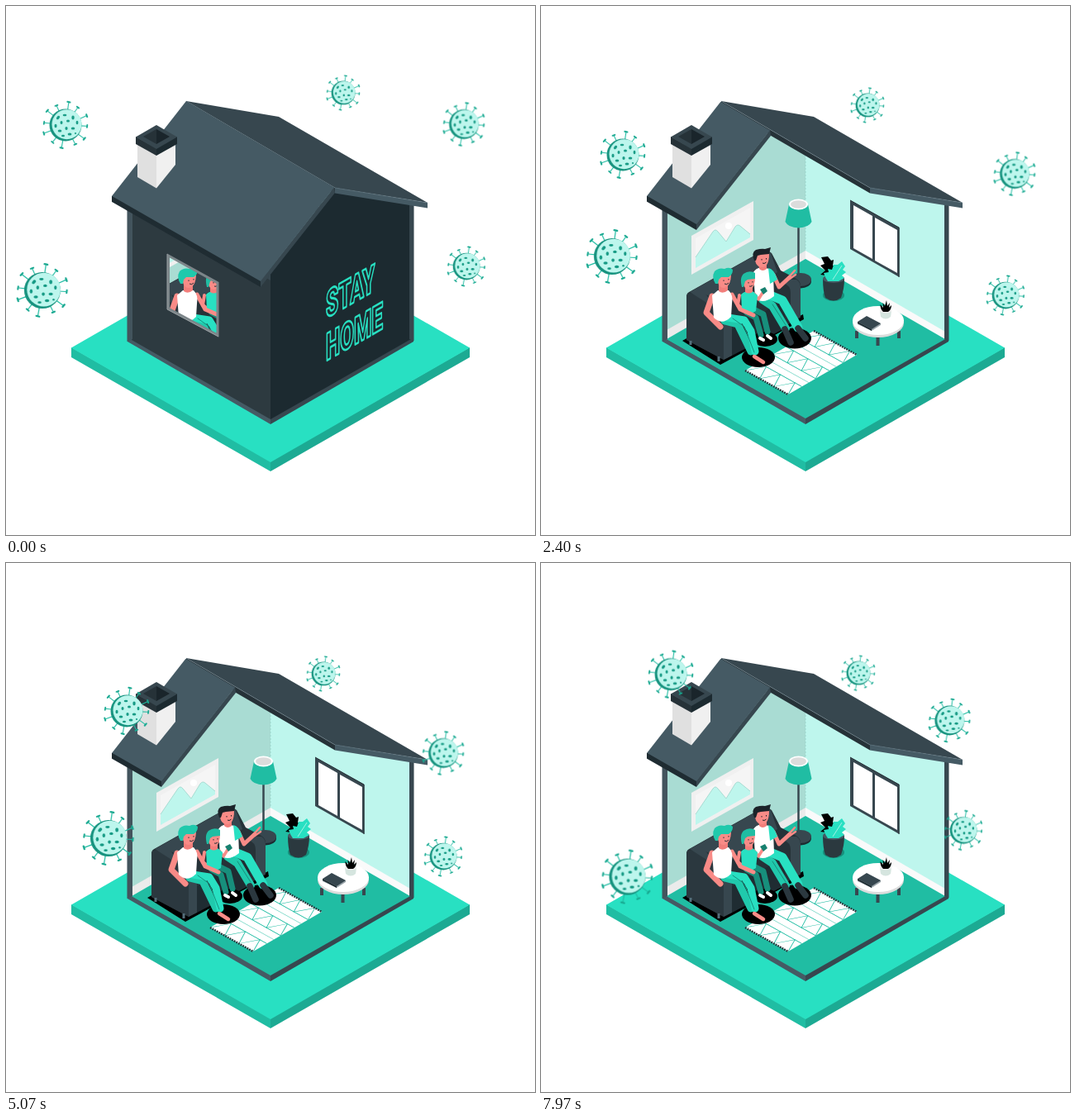
An HTML page without scripts that plays this animation: 640 px wide and 640 px high, repeating every 8 s.

```html
<!DOCTYPE html>
<html lang="en">
<head>
<meta charset="utf-8">
<title>Stay home</title>
<style>
html, body { margin: 0; width: 100%; height: 100%; overflow: hidden; background: #fff; }
svg { display: block; width: 100vw; height: 100vh; }

.virus, .roof, .wipe, .front { animation: 8s linear infinite; }
.roof { animation-name: roof; }
.wipe { animation-name: wipe; }
.front { animation-name: fade; }
.a { animation-name: a; }
.b { animation-name: b; }
.c { animation-name: c; }
.d { animation-name: d; }
.e { animation-name: e; }

@keyframes roof {
  0%, 12.5% { transform: translate(0, 0); animation-timing-function: ease-in; }
  19.13% { transform: translate(-29px, -16.7px); animation-timing-function: cubic-bezier(.4, .4, .6, 1); }
  28.75%, 100% { transform: translate(-120px, -69px); }
}
@keyframes wipe {
  0%, 12.5% { transform: translateY(-90px); animation-timing-function: ease-in; }
  19.13% { transform: translateY(0); animation-timing-function: cubic-bezier(.4, .4, .6, 1); }
  28.75%, 100% { transform: translateY(175px); }
}
@keyframes fade {
  0%, 12.5% { opacity: 1; animation-timing-function: ease-in; }
  19.13% { opacity: .87; animation-timing-function: cubic-bezier(.4, .3, .6, 1); }
  28.75%, 100% { opacity: 0; }
}

/* drifting paths */
@keyframes a {
  0% { transform: translate(72px, 144px); }
  9.56% { transform: translate(77.9px, 157.1px); }
  19.13% { transform: translate(86px, 169px); }
  24.56% { transform: translate(92.2px, 175px); }
  30% { transform: translate(99px, 180px); }
  39.8% { transform: translate(112.7px, 184.7px); }
  49.63% { transform: translate(127px, 185px); }
  56.5% { transform: translate(137.1px, 182.8px); }
  63.38% { transform: translate(146px, 179px); }
  73.75% { transform: translate(154.2px, 172px); }
  84.13% { transform: translate(158px, 161px); }
  91.9% { transform: translate(158.5px, 148.7px); }
  100% { transform: translate(157px, 134px); }
}
@keyframes b {
  0% { transform: translate(44px, 344px); }
  9.56% { transform: translate(46.5px, 322px); }
  19.13% { transform: translate(62px, 307px); }
  24.56% { transform: translate(73.8px, 303.2px); }
  30% { transform: translate(86px, 303px); }
  39.8% { transform: translate(101.6px, 306.4px); }
  49.63% { transform: translate(113px, 315px); }
  56.5% { transform: translate(119.6px, 323.4px); }
  63.38% { transform: translate(124px, 333px); }
  73.75% { transform: translate(125.2px, 348.3px); }
  84.13% { transform: translate(121px, 363px); }
  91.9% { transform: translate(114px, 372.1px); }
  100% { transform: translate(104px, 380px); }
}
@keyframes c {
  0% { transform: translate(408px, 105px); }
  19.13% { transform: translate(400px, 114px); }
  30% { transform: translate(395px, 120px); }
  49.63% { transform: translate(388px, 129px); }
  63.38% { transform: translate(384px, 134px); }
  73.75% { transform: translate(381.8px, 136.7px); }
  84.13% { transform: translate(381px, 137px); }
  91.9% { transform: translate(381.6px, 136px); }
  100% { transform: translate(384px, 133px); }
}
@keyframes d {
  0% { transform: translate(554px, 143px); }
  9.56% { transform: translate(567px, 158.9px); }
  19.13% { transform: translate(574px, 178px); }
  24.56% { transform: translate(574.6px, 190.6px); }
  30% { transform: translate(573px, 203px); }
  39.8% { transform: translate(563.7px, 222.9px); }
  49.63% { transform: translate(550px, 235px); }
  56.5% { transform: translate(539.5px, 234.3px); }
  63.38% { transform: translate(529px, 230px); }
  73.75% { transform: translate(516.4px, 221.4px); }
  84.13% { transform: translate(506px, 210px); }
  91.9% { transform: translate(499.5px, 200.6px); }
  100% { transform: translate(494px, 190px); }
}
@keyframes e {
  0% { transform: translate(557px, 315px); }
  9.56% { transform: translate(564.5px, 326px); }
  19.13% { transform: translate(567px, 337px); }
  24.56% { transform: translate(565.2px, 343.9px); }
  30% { transform: translate(562px, 350px); }
  39.8% { transform: translate(554px, 356.1px); }
  49.63% { transform: translate(544px, 358px); }
  56.5% { transform: translate(536.3px, 357.3px); }
  63.38% { transform: translate(529px, 355px); }
  73.75% { transform: translate(520.7px, 348.8px); }
  84.13% { transform: translate(515px, 340px); }
  91.9% { transform: translate(512.3px, 332px); }
  100% { transform: translate(511px, 323px); }
}

.sign { font: 900 46px Roboto, "Open Sans", sans-serif; fill: none; stroke: #28e0c2; stroke-width: 2.8; stroke-linejoin: round; }
.limb { fill: none; stroke-linecap: round; stroke-linejoin: round; }
</style>
</head>
<body>
<svg viewBox="0 0 640 640">
<defs>
  <g id="spike">
    <path d="M0-18V-27.500" stroke="#20bda3" stroke-width="1.100"/>
    <path d="M-1.600-28.200L1.600-28" stroke="#18a890" stroke-width="2" stroke-linecap="round"/>
  </g>
  <g id="pair"><use href="#spike" transform="rotate(8)"/><use href="#spike" transform="rotate(35) scale(.93)"/></g>
  <g id="virus">
    <use href="#pair"/><use href="#pair" transform="rotate(58)"/><use href="#pair" transform="rotate(118)"/>
    <use href="#pair" transform="rotate(182)"/><use href="#pair" transform="rotate(241)"/>
    <use href="#pair" transform="rotate(300)"/>
    <circle r="19.500" fill="#17937f"/>
    <circle cx="1.500" cy="-.8" r="18" fill="#bdf6ed"/>
    <g fill="#159a84">
      <ellipse cx="-9" cy="-9" rx="1.700" ry="2.500" transform="rotate(40 -9 -9)"/>
      <ellipse cx="-1" cy="-12" rx="2.300" ry="1.300"/><ellipse cx="9" cy="-9" rx="1.700" ry="2.400"/>
      <ellipse cx="14" cy="-3" rx="1.400" ry="2.200"/><ellipse cx="3" cy="-5" rx="2" ry="1.500"/>
      <ellipse cx="-5" cy="-3" rx="1.500" ry="2.100"/><ellipse cx="-12" cy="1" rx="1.500" ry="2.300"/>
      <ellipse cx="9" cy="4" rx="2.300" ry="1.600"/><ellipse cx="1" cy="4" rx="1.600" ry="1.900"/>
      <ellipse cx="-7" cy="7" rx="2.300" ry="1.600"/><ellipse cx="5" cy="11" rx="2.400" ry="1.500"/>
      <ellipse cx="-3" cy="13" rx="2" ry="1.200"/><circle cx="12" cy="10" r="1.100"/>
    </g>
  </g>
  <clipPath id="behind"><path d="M218 115H640V420H128V230Z"/></clipPath>
  <clipPath id="below"><path class="wipe" d="M140 252L320 338L500 263V800H140Z"/></clipPath>
</defs>

<!-- ground -->
<path d="M79 413V425L320 563V551Z" fill="#20bda3"/>
<path d="M561 413V425L320 563V551Z" fill="#1caa93"/>
<path d="M79 413.5L320 275L561 413.5L320 552Z" fill="#28e0c2"/>

<!-- room -->
<path d="M147 400V406L320 506V498Z" fill="#455a64"/>
<path d="M493 400V406L320 506V498Z" fill="#37474f"/>
<path d="M320 300L489 403L320 499L152 403Z" fill="#20bda3"/>
<path d="M152 235L280 155L320 178V300L152 396Z" fill="#a9dcd3"/>
<path d="M320 176L398 222L489 240V398L320 300Z" fill="#bef6ed"/>
<path d="M152 392L320 296V306L152 403Z" fill="#ebebeb"/>
<path d="M489 394L320 296V306L489 403Z" fill="#fafafa"/>
<path d="M320 180V296" stroke="#93cfc4" stroke-width=".7" stroke-dasharray="2 2"/>

<!-- wall window -->
<path d="M374 235L433.500 268V328L374 294Z" fill="#37474f"/>
<path d="M378 241L401 254V306L378 293Z M404 256L431 271V323L404 308Z" fill="#fff"/>
<path d="M374 235L433 268V328" fill="none" stroke="#263238" stroke-width="1"/>

<!-- picture -->
<path d="M182 278L257 236V283L182 325Z" fill="#f0f0f0"/>
<path d="M187 281L253 244V280L187 317Z" fill="#f5f5f5"/>
<path d="M187 317V304L208 273Q211 269 214 273L224 285L235 267Q238 263 242 267L253 276V280Z" fill="#bef6ed"/>
<path d="M187 304L208 273Q211 269 214 273L224 285L235 267Q238 263 242 267L253 276" fill="none" stroke="#a9dcd3"/>
<circle cx="227" cy="266" r="4" fill="#fff"/>

<!-- lamp -->
<ellipse cx="314" cy="333" rx="13" ry="8.500" fill="#1c2a30"/>
<ellipse cx="314" cy="331" rx="13" ry="8" fill="#37474f"/>
<path d="M311.500 266V331" stroke="#37474f" stroke-width="2.500"/>
<path d="M300 240L295.500 261Q299 268 311.500 268.500Q324 268 327.500 261L323 240Z" fill="#20bda3"/>
<ellipse cx="311.500" cy="240" rx="11.500" ry="6.500" fill="#fff"/>
<ellipse cx="311.500" cy="240" rx="9.500" ry="4.800" fill="#dcdcdc"/>

<!-- plant -->
<ellipse cx="354" cy="350" rx="13" ry="7" fill="#178f7c"/>
<path d="M341 330Q341 345 344 353Q354 360 363 353Q367 342 367 330Z" fill="#2b393f"/>
<ellipse cx="354" cy="330" rx="13" ry="5" fill="#455a64"/>
<path d="M349 331L345 326L338 325L344 320L338 314L343 312L339 304L347 303L351 308L354 307L353 314L358 315L353 321L355 326Z" fill="#000"/>
<path d="M347 333Q344 329 342 323L348 322L347 318L352 319L354 313L359 313L364 309L368 315L365 319L369 322L364 326L367 329L360 333Z" fill="#28e0c2"/>
<path d="M353 331L364 314" stroke="#bef6ed" stroke-width=".8"/>

<!-- table -->
<path d="M382 393V402M407.500 401V411M433 393V402" stroke="#37474f" stroke-width="4"/>
<ellipse cx="408" cy="383" rx="31" ry="18" fill="#dcdcdc"/>
<ellipse cx="408" cy="380.500" rx="31" ry="17.500" fill="#fff"/>
<path d="M383 382V385L400 393L411 386V384Z" fill="#9aa5aa"/>
<path d="M383 382L394 375L411 384L400 391Z" fill="#37474f"/>
<path d="M383 382V384L400 393V391Z" fill="#1c2a30"/>
<path d="M410 369L411 376Q417 381 423 376L424 369Z" fill="#d5e5df"/>
<ellipse cx="417" cy="369" rx="7" ry="2.500" fill="#ececec"/>
<path d="M414 370Q410 366 410.500 361L414 365L413.500 359L416 363L418 356L419 363L422 359L421 365L424 362Q424 367 420 370Z" fill="#000"/>

<!-- rug, drawn flat on the floor -->
<path d="M247 441L330 393L382 422L299 470Z" fill="#fff"/>
<g transform="matrix(.83 -.48 .52 .29 247 441)" fill="none" stroke="#20bda3" stroke-width="1.100">
  <path d="M20 0V100M40 0V100M60 0V100M80 0V100"/>
  <path id="zigzag" d="M0 0L20 17L0 34L20 50L0 67L20 84L0 100"/>
  <use href="#zigzag" x="40"/>
  <use href="#zigzag" x="80"/>
  <path d="M30 0V100M70 0V100" stroke-width=".6"/>
</g>
<path d="M247 441L299 470M330 393L382 422" stroke="#263238" stroke-width="2.400" stroke-dasharray="1.8 1.200"/>

<!-- sofa -->
<path d="M171 405L178 401L220 424L317 373L318 379L217 434Z" fill="#000"/>
<path d="M176 351Q176 347 181 345L265 298Q273 293 279 299L290 320L309 330Q314 333 314 339V377L221 428L176 404Z" fill="#263238"/>
<path d="M184 344L266 298Q273 294 278 299L286 322L225 358Z" fill="#37474f"/>
<path d="M176 351Q178 345 186 349L213 366Q221 371 221 379V428L176 404Z" fill="#2b383f"/>
<path d="M180 346L188 342Q196 343 202 352L228 380Q231 384 231 390V423L221 428V380Q221 372 213 367Z" fill="#37474f"/>
<path d="M231 391L295 356V390L231 423Z" fill="#1f2c32"/>
<path d="M296 331L309 331Q314 334 314 341V376L302 383V347Q302 338 293 335Z" fill="#37474f"/>
<path d="M181 405V410M215 424V430" stroke="#546e7a" stroke-width="3"/>
<ellipse cx="263" cy="425" rx="20" ry="12" fill="#000"/>
<ellipse cx="307" cy="402" rx="20" ry="12.500" fill="#000"/>
<ellipse cx="271" cy="403" rx="15" ry="9" fill="#000"/>

<!-- father -->
<g class="limb">
  <path d="M281 325L288 340L301 328" stroke="#f98b87" stroke-width="5"/>
  <path d="M299 329L307 320M301 330L308 325" stroke="#f98b87" stroke-width="2.500"/>
  <path d="M268 355L280 363L296 390" stroke="#20c9ac" stroke-width="10"/>
  <path d="M275 349L292 356L311 389" stroke="#28e0c2" stroke-width="11"/>
  <path d="M280 361L296 386" stroke="#178f7c" stroke-width="1"/>
  <path d="M295 391L302 407M311 390L320 402" stroke="#2b383f" stroke-width="7.500"/>
</g>
<path d="M257 322Q261 316 268 317Q279 316 281 325L282 351Q268 362 259 353Z" fill="#fff"/>
<path d="M275 317Q282 318 286 331L277 336Z" fill="#28e0c2"/>
<path d="M263 309H273V318Q268 322 264 318Z" fill="#f27e7b"/>
<path d="M259 302Q258 316 268 316Q276 315 276 300L265 297Z" fill="#f98b87"/>
<path d="M258 308Q254 298 260 295Q267 293 271 294L278 292L276 300L266 301L262 302L260 308Z" fill="#1c2329"/>
<path d="M267 306V307.500M272.500 305V306.500M268 311Q270 312.500 272.500 310" fill="none" stroke="#1c2329"/>

<!-- daughter -->
<g class="limb">
  <path d="M249 371L260 377L266 398M257 367L269 373L274 394" stroke="#178f7c" stroke-width="7"/>
  <path d="M265 402L269 404M274 399L278 402" stroke="#fff" stroke-width="4"/>
  <path d="M258 348L263 355L268 347" stroke="#f98b87" stroke-width="3.500"/>
  <path d="M240 350L238 362L252 372" stroke="#f98b87" stroke-width="4"/>
</g>
<path d="M242 349Q247 344 256 345L262 350L260 369Q250 376 243 368Z" fill="#28e0c2"/>
<path d="M247 338H256V346Q251 349 247 346Z" fill="#f27e7b"/>
<path d="M244 329Q244 343 252 343Q259 342 259 328Z" fill="#f98b87"/>
<path d="M243 340Q240 329 245 324Q252 319 259 323L259 330L250 331L247 333L245 340Z" fill="#20bda3"/>
<path d="M251 334V335.500M256 333V334.500M252 339Q254 340 256 338" fill="none" stroke="#263238"/>
<path d="M265 343L271 340L274 345L269 349Z" fill="#17806f"/>

<!-- mother -->
<g class="limb">
  <path d="M231 349L241 367L257 374" stroke="#f98b87" stroke-width="5"/>
  <path d="M222 381L238 385L254 418" stroke="#20c9ac" stroke-width="9"/>
  <path d="M226 377L246 380L254 393L259 418" stroke="#28e0c2" stroke-width="9"/>
  <path d="M232 378L246 388L258 419" stroke="#178f7c" stroke-width="1"/>
  <path d="M258 424L269 431" stroke="#f98b87" stroke-width="4.500"/>
  <path d="M207 351L200 371L217 388" stroke="#f98b87" stroke-width="7"/>
</g>
<path d="M207 350L214 344L227 344Q233 350 231 360L230 376Q219 387 209 377Z" fill="#fff"/>
<path d="M215 334H226V344Q220 349 215 345Z" fill="#f27e7b"/>
<path d="M213 325Q213 341 221 341Q230 340 230 323Z" fill="#f98b87"/>
<path d="M211 336Q206 328 210 321Q215 316 222 318Q228 315 232 319Q232 325 227 328L218 328L215 331L214 336Z" fill="#20c9ac"/>
<path d="M221 331.500V333M227 330V331.500M222 336Q225 338 227 335" fill="none" stroke="#263238"/>

<!-- front walls -->
<g class="front">
  <g clip-path="url(#below)">
    <path fill-rule="evenodd" d="M152 236L320 332V500L152 404Z M196 302V366L256 398V335Z" fill="#2d3a40"/>
    <path d="M320 318L398 222L490 240V403L320 500Z" fill="#1c2a30"/>
  </g>
  <path d="M196.500 302V366L256 398V335Z" fill="none" stroke="#7c8589" stroke-width="3"/>
  <path d="M195 300V367L257 400" fill="none" stroke="#9aa1a4" stroke-width="1"/>
  <text class="sign" transform="matrix(.53 -.302 0 1 387 378)">STAY</text>
  <text class="sign" transform="matrix(.53 -.302 0 1 387 429.500)">HOME</text>
</g>

<!-- frame -->
<path d="M146.500 238H153V403L146.500 406Z" fill="#43545d"/>
<path d="M488 236H493.500V405L488 403Z" fill="#37474f"/>

<!-- roof -->
<path d="M218 115L398 220V226.500L218 122Z" fill="#263238"/>
<path d="M398 219.500L510 238V244.500L398 226.500Z" fill="#455a64"/>
<path d="M218 115L330 134L510 238L398 220Z" fill="#37474f"/>
<path d="M218 115L398 220L510 238" fill="none" stroke="#78909c" stroke-width=".7" opacity=".6"/>
<g clip-path="url(#behind)">
  <g class="roof">
    <path d="M6 159V167L308 340V332Z" fill="#1f2c32"/>
    <path d="M397 219L398 226L308 340V332Z" fill="#37474f"/>
    <path d="M96 44L397 219.500L308 333L6 160Z" fill="#455a64"/>
  </g>
</g>

<!-- chimney -->
<path d="M159 163L182 177V220.500L159 207Z" fill="#e0e0e0"/>
<path d="M205 163L182 177V220.500L205 192Z" fill="#f0f0f0"/>
<path d="M157 158V167L182 181V172Z" fill="#263238"/>
<path d="M207 158V167L182 181V172Z" fill="#1c2a30"/>
<path d="M157 158.500L182 144L207 158.500L182 173Z" fill="#37474f"/>
<path d="M166 158L182 149V167Z" fill="#263238"/>
<path d="M198 158L182 149V167Z" fill="#1a252b"/>

<!-- viruses -->
<g class="virus a"><use href="#virus"/></g>
<g class="virus b"><use href="#virus" transform="scale(1.13)"/></g>
<g class="virus c"><use href="#virus" transform="scale(.74)"/></g>
<g class="virus d"><use href="#virus" transform="scale(.92)"/></g>
<g class="virus e"><use href="#virus" transform="scale(.84)"/></g>
</svg>
</body>
</html>
```
